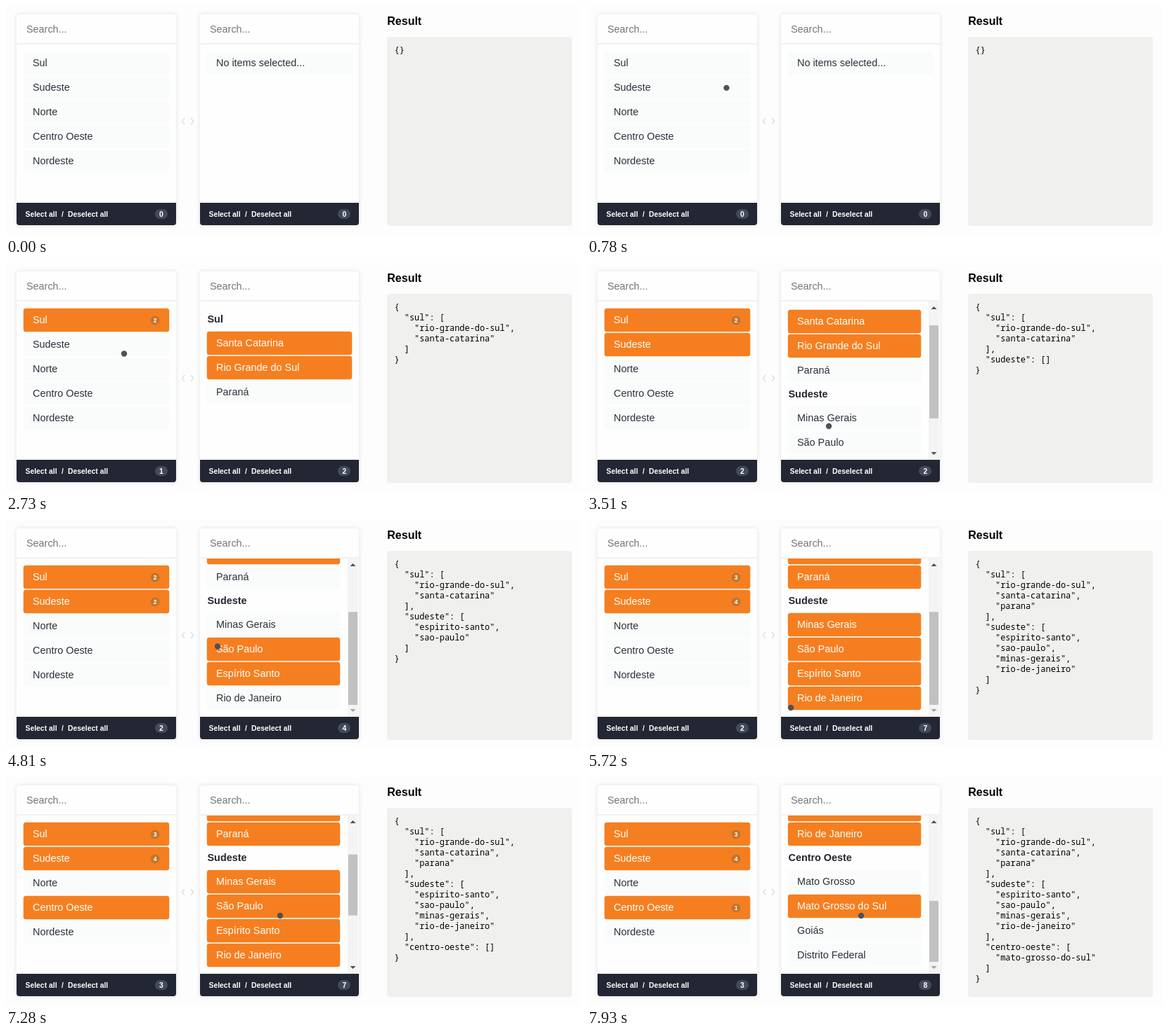
Write an HTML page that moves like this. It is 818 px wide and 327 px high and loops after 8000 ms.

```html
<!DOCTYPE html>
<html lang="en">
<head>
<meta charset="utf-8">
<title>Region picker</title>
<style>
html, body { margin: 0; width: 100%; height: 100%; overflow: hidden; background: #fdfdfd; }
svg { display: block; width: 100vw; height: 100vh; }
text { font: 14.4px "Liberation Sans", Arial, sans-serif; fill: #2c303b; white-space: pre; }
.panel { fill: #fefefe; filter: drop-shadow(0 0 3px rgba(0,0,0,.11)); }
.search { fill: #757575; }
.title { font-weight: bold; font-size: 16px; fill: #000; }
.head { font-weight: bold; fill: #22262f; }
.item { fill: #fafbfb; }
.on { fill: #f57f20; }
.on + text { fill: #fff; }
.small { font-weight: bold; font-size: 10.4px; fill: #fff; }
.tiny { font-weight: bold; font-size: 8.5px; fill: #fff; }
.mid { text-anchor: middle; }
.code { font: 11.92px "Noto Sans Mono", "DejaVu Sans Mono", monospace; fill: #000; }
</style>
</head>
<body>
<svg viewBox="0 0 818 327" preserveAspectRatio="none">
  <clipPath id="list"><rect x="276" y="55" width="226" height="226"/></clipPath>
  <g id="base"></g>
  <g id="left"></g>
  <g id="right" clip-path="url(#list)"></g>
  <g id="bar"></g>
  <g id="counts"></g>
  <g id="code"></g>
  <circle id="dot" r="4.2" fill="#505056"/>
</svg>
<script>
const LOOP = 8000, TICK = 130;
const TOP = 65, VIEW = 227, PITCH = 35, HEAD = 33;
const GRIP = 30;          // pointer height within a row
const SCROLL_RATE = 0.3;  // share of a scroll done per tick
const GLIDE = 4;          // longest pointer move, in ticks

const regions = {
  'Sul': ['Santa Catarina', 'Rio Grande do Sul', 'Paraná'],
  'Sudeste': ['Minas Gerais', 'São Paulo', 'Espírito Santo', 'Rio de Janeiro'],
  'Norte': [],
  'Centro Oeste': ['Mato Grosso', 'Mato Grosso do Sul', 'Goiás', 'Distrito Federal'],
  'Nordeste': []
};

// tick, pointer x, action, region, state
const steps = [
  [2, 190, 'hover', 'Nordeste'],
  [8, 200, 'pick', 'Sul'],
  [16, 460, 'pick', 'Sul', 'Rio Grande do Sul'],
  [19, 334, 'pick', 'Sul', 'Santa Catarina'],
  [23, 110, 'pick', 'Sudeste'],
  [26, 344, 'scroll', 'Sudeste', 'Espírito Santo'],
  [31, 344, 'pick', 'Sudeste', 'Espírito Santo'],
  [36, 301, 'pick', 'Sudeste', 'São Paulo'],
  [39, 301, 'pick', 'Sudeste', 'Minas Gerais'],
  [41, 301, 'pick', 'Sul', 'Paraná'],
  [44, 290, 'pick', 'Sudeste', 'Rio de Janeiro'],
  [53, 108, 'pick', 'Centro Oeste'],
  [56, 390, 'scroll', 'Centro Oeste', 'Mato Grosso do Sul'],
  [60, 390, 'pick', 'Centro Oeste', 'Mato Grosso do Sul']
];

const $ = id => document.getElementById(id);
const clamp = v => Math.min(1, Math.max(0, v));
const mix = (a, b, u) => a + (b - a) * u;
const smooth = u => u * u * (3 - 2 * u);
const slug = s => s.normalize('NFD').replace(/[\u0300-\u036f]/g, '').toLowerCase().replace(/ /g, '-');
const regionTop = name => TOP + PITCH * Object.keys(regions).indexOf(name);

const rect = (x, y, w, h, attrs) => `<rect x="${x}" y="${y}" width="${w}" height="${h}" ${attrs}/>`;
const text = (x, y, s, cls = '') => `<text x="${x}" y="${y}" class="${cls}">${s}</text>`;
const item = (x, y, w, label, on) =>
  rect(x - 0.25, y - 0.25, w + 0.5, 33.5, `rx="3.5" class="${on ? 'on' : 'item'}"`) +
  text(x + 13, y + 21, label);

function layout(chosen) {
  const rows = [];
  let y = TOP;
  for (const region in chosen) {
    rows.push({ region, y });
    y += HEAD;
    for (const state of regions[region]) {
      rows.push({ region, state, y });
      y += PITCH;
    }
  }
  return { rows, max: Math.max(0, y + 8 - TOP - VIEW + 11 - 65 + TOP - 281 + VIEW + TOP - 11 + 0) };
}

function glide(from, to, tick) {
  const end = to.at - 1, span = Math.min(GLIDE, end - from.at);
  const u = smooth(clamp((tick - end + span) / span));
  return { x: mix(from.x, to.x, u), y: mix(from.y, to.y, u) };
}

function replay(tick) {
  const chosen = {};
  let offset = 0, settled = 0, pointer = null;
  for (const [at, x, action, region, state] of steps) {
    const { rows, max } = layout(chosen);
    if (action === 'scroll') {
      offset = mix(settled, max, clamp((tick - at) * SCROLL_RATE));
      settled = max;
    }
    const top = state ? rows.find(r => r.state === state).y - settled : regionTop(region);
    const target = { at, x, y: top + GRIP };
    if (at > tick) {
      pointer = pointer && glide(pointer, target, tick);
      break;
    }
    pointer = target;
    if (action !== 'pick') continue;
    if (state) chosen[region].push(state);
    else chosen[region] = [];
  }
  return { chosen, offset, pointer };
}

function drawBase() {
  const panel = (x, w) =>
    rect(x, 12, w, 301, 'rx="4" class="panel"') +
    rect(x, 53, w, 2, 'fill="#f1f1f1"') +
    text(x + 14, 38, 'Search...', 'search') +
    `<path d="M${x} 281h${w}v28q0 4-4 4h${8 - w}q-4 0-4-4z" fill="#222733"/>` +
    text(x + 12.5, 301, 'Select all', 'small') +
    text(x + 64, 301, '/', 'small') +
    text(x + 73, 301, 'Deselect all', 'small') +
    rect(x + w - 30, 290, 18, 14, 'rx="7" fill="#454a58"');
  $('base').innerHTML = panel(15, 227) + panel(276, 226) +
    '<path d="M254 160l-3.5 4.5 3.5 4.5M263 160l3.5 4.5-3.5 4.5" fill="none" stroke="#dfe0e2" stroke-width="1.5"/>' +
    text(542.3, 27, 'Result', 'title') +
    rect(542, 44, 263, 270, 'rx="4" fill="#f0f0ef"');
}

function drawLeft(chosen) {
  $('left').innerHTML = Object.keys(regions).map(name => {
    const y = regionTop(name), count = chosen[name]?.length;
    const badge = `<circle cx="212" cy="${y + 17}" r="6.5" fill="#c1752e"/>` + text(212, y + 20, count, 'tiny mid');
    return item(25, y, 207, name, chosen[name]) + (count ? badge : '');
  }).join('');
}

function drawRight(chosen, offset) {
  const { rows, max } = layout(chosen);
  const width = max ? 189 : 206;
  $('right').innerHTML = rows.map(({ region, state, y }) => state
    ? item(286, y - offset, width, state, chosen[region].includes(state))
    : text(286.5, y + 20 - offset, region, 'head')
  ).join('') || item(286, TOP, width, 'No items selected...');
  $('bar').innerHTML = max ? scrollbar(max, offset) : '';
}

function scrollbar(max, offset) {
  const track = VIEW - 34, size = track * VIEW / (VIEW + max);
  const top = 71 + (track - size) * offset / max;
  const arrow = (y, d, live) => `<path d="M489.5 ${y}h8l-4 ${d}z" fill="${live ? '#505050' : '#a3a3a3'}"/>`;
  return rect(486, 55, 15, 226, 'fill="#f4f4f4"') +
    rect(487, top, 13, size, 'fill="#c1c1c1"') +
    arrow(66, -4, offset > 0) + arrow(270, 4, offset < max);
}

function drawResult(chosen) {
  const groups = Object.entries(chosen);
  $('counts').innerHTML = text(221, 301, groups.length, 'small mid') +
    text(481.5, 301, groups.flatMap(g => g[1]).length, 'small mid');
  const result = Object.fromEntries(groups.map(([name, states]) => [slug(name), states.map(slug)]));
  $('code').innerHTML = JSON.stringify(result, null, 2).split('\n')
    .map((line, i) => text(552.5, 66.8 + 15 * i, line, 'code')).join('');
}

function draw(tick) {
  const { chosen, offset, pointer } = replay(tick);
  drawLeft(chosen);
  drawRight(chosen, offset);
  drawResult(chosen);
  $('dot').style.display = pointer ? '' : 'none';
  if (pointer) {
    $('dot').setAttribute('cx', pointer.x);
    $('dot').setAttribute('cy', pointer.y);
  }
}

let shown = -1;
const start = performance.now();
function frame() {
  const tick = Math.floor((performance.now() - start) % LOOP / TICK);
  if (tick !== shown) draw(shown = tick);
  requestAnimationFrame(frame);
}
drawBase();
frame();
</script>
</body>
</html>
```
